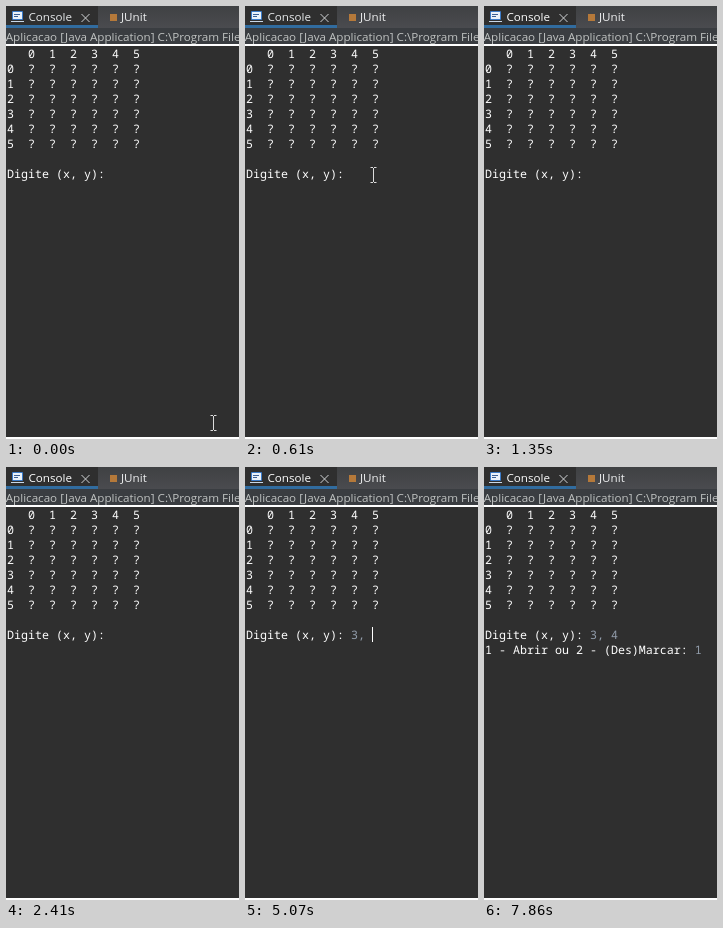
Write an HTML page that moves like this. It is 233 by 433 pixels and loops after 8000 ms.

```html
<!DOCTYPE html>
<html lang="pt">
<head>
<meta charset="utf-8">
<title>Console</title>
<style>
  html, body { margin: 0; width: 100%; height: 100%; overflow: hidden; background: #2f2f2f; }
  svg { display: block; width: 233px; height: 433px; }
  text { white-space: pre; }
  .ui { font: 11.65px "Open Sans", sans-serif; }
  .mono { font: 500 11.667px "Noto Sans Mono", monospace; fill: #fff; text-rendering: geometricPrecision; }
  .typed { fill: #929dab; }
</style>
</head>
<body>
<svg viewBox="0 0 233 433">
  <defs>
    <linearGradient id="bar" x2="0" y2="1">
      <stop stop-color="#3f4143"/>
      <stop offset="1" stop-color="#4a4b4f"/>
    </linearGradient>
  </defs>
  <rect width="233" height="433" fill="#2f2f2f"/>
  <rect x="92" width="141" height="22" fill="url(#bar)"/>
  <rect y="19" width="92" height="3" fill="#316c9f"/>
  <rect y="22" width="233" height="16" fill="#3a3d41"/>
  <rect y="38" width="233" height="2" fill="#fff"/>
  <rect y="431" width="233" height="2" fill="#fff"/>

  <!-- console icon -->
  <rect x="6" y="5" width="11" height="9" rx="1" fill="#3d7cc9"/>
  <rect x="7" y="6" width="9" height="7" fill="#e9f1fa"/>
  <path d="M8 8.5h6M8 10.5h4" stroke="#3b5f94"/>
  <path d="M5 15.5h13" stroke="#c9d8e8"/>

  <path d="M75.5 8l8 8m0-8l-8 8" stroke="#d0d2d4"/>
  <rect x="104" y="8" width="7" height="7" fill="#b5793a"/>

  <text id="tabTitle" class="ui" x="22.5" y="15">Console</text>
  <text class="ui" x="115" y="15" fill="#f0f1f2">JUnit</text>
  <text class="ui" x="-0.3" y="35" fill="#c0c3c2">Aplicacao [Java Application] C:\Program File</text>

  <g id="board"></g>
  <text class="mono" x="1" y="172">Digite (x, y): <tspan id="coords" class="typed"></tspan></text>
  <text class="mono" x="1" y="187"><tspan id="prompt"></tspan><tspan id="choice" class="typed"></tspan></text>
  <rect id="caret" width="1" height="15" fill="#fff"/>
  <path id="pointer" d="M-3 -7.5h2.5M.5 -7.5h2.5M0 -7v14M-3 7.5h2.5M.5 7.5h2.5" fill="none" stroke="#dcdcdc"/>
</svg>
<script>
const LOOP = 8000, CELL = 7, LEFT = 1, SIZE = 6;
const PROMPT = "1 - Abrir ou 2 - (Des)Marcar: ";
const $ = id => document.getElementById(id);

const digits = [...Array(SIZE).keys()];
const rows = ["   " + digits.join("  "), ...digits.map(d => d + "  ?".repeat(SIZE))];
rows.forEach((row, i) => {
  const line = document.createElementNS("http://www.w3.org/2000/svg", "text");
  line.setAttribute("class", "mono");
  line.setAttribute("x", LEFT);
  line.setAttribute("y", 52 + 15 * i);
  line.textContent = row;
  $("board").append(line);
});

// [start time, value], each held until the next entry
const coords = [[0, ""], [3870, "3"], [4930, "3,"], [5070, "3, "], [5530, "3, 4"]];
const prompt = [[0, ""], [6260, PROMPT]];
const choice = [[0, ""], [7330, "1"]];
// caret as [column, top], or null while blinked off
const caret = [
  [0, null], [810, [15, 160]], [1350, null], [1880, [15, 160]], [2410, null],
  [2940, [15, 160]], [3470, null], [3870, [16, 160]], [4330, null], [4870, [16, 160]],
  [4930, [17, 160]], [5070, [18, 160]], [5530, [19, 160]], [6060, null],
  [6190, [0, 175]], [6790, null], [7330, [31, 175]], [7860, null]
];
const drift = [[0, [128.5, 169]], [880, [118, 170.5]], [970, [142, 166]], [1060, [178.5, 160.5]], [1150, null]];

const at = (track, t) => track.findLast(([start]) => start <= t)[1];

function pointerAt(t) {
  if (t >= 610) return at(drift, t);
  const step = t < 70 ? 0 : 1 + Math.floor((t - 70) / 67.5);
  const p = step / 9, ease = p * p * (3 - 2 * p);
  return [Math.floor(207.5 - 79 * ease) + 0.5, Math.round(417 - 248 * ease)];
}

function place(id, position) {
  $(id).style.display = position ? "" : "none";
  if (position) $(id).setAttribute("transform", `translate(${position})`);
}

function setText(id, value) {
  if ($(id).textContent !== value) $(id).textContent = value;
}

function draw() {
  const t = performance.now() % LOOP;
  const cell = at(caret, t);
  setText("coords", at(coords, t));
  setText("prompt", at(prompt, t));
  setText("choice", at(choice, t));
  place("caret", cell && [LEFT + cell[0] * CELL, cell[1]]);
  place("pointer", pointerAt(t));
  $("tabTitle").setAttribute("fill", t < 740 ? "#e8eaec" : "#fff");
  requestAnimationFrame(draw);
}
draw();
</script>
</body>
</html>
```
